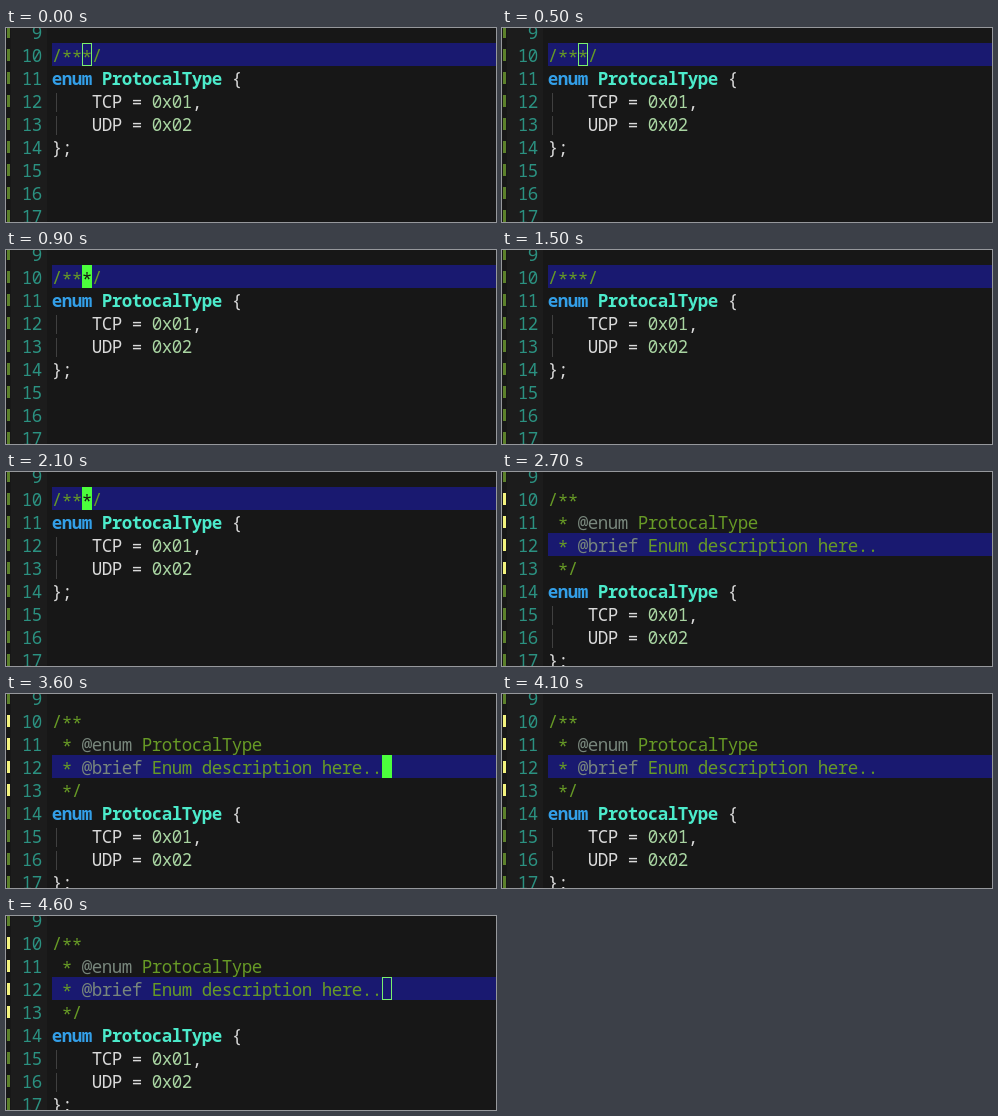
Write an HTML page with a canvas that moves like this. It is 490 px wide and 194 px high and loops after 4.7 s.

```html
<!DOCTYPE html>
<html lang="en">
<head>
<meta charset="utf-8">
<title>Enum doc comment</title>
<style>
  html, body { margin: 0; width: 490px; height: 194px; overflow: hidden; background: #171717; }
  canvas { display: block; }
</style>
</head>
<body>
<canvas id="stage" width="490" height="194"></canvas>
<script>
const ctx = document.getElementById('stage').getContext('2d');
const W = 490, H = 194, LOOP = 4700;
const CELL = 10, ROW = 23, LEFT = 46, FIRST = 9, TOP = -8;
const FOCUS = 800, EXPAND = 2200, BLUR = 4400, BLINK = 500;

const C = {
  bg: '#171717', gutter: '#1c1c1c', line: '#191970', number: '#2b9181',
  added: '#5c812b', changed: '#f3f37e', cursor: '#4cff3c', hollow: '#7af06e',
  text: '#dadada', keyword: '#339fe8', type: '#4cebcb', value: '#a9d5a2',
  comment: '#679a26', tag: '#78867c', guide: '#404040'
};

// Each line is a list of [text, colour] runs.
const code = [
  [['enum ', C.keyword], ['ProtocalType', C.type], [' {', C.text]],
  [['    TCP = ', C.text], ['0x01', C.value], [',', C.text]],
  [['    UDP = ', C.text], ['0x02', C.value]],
  [['};', C.text]]
];
const before = [[], [['/***/', C.comment]], ...code];
const after = [
  [],
  [['/**', C.comment]],
  [[' * ', C.comment], ['@enum', C.tag], [' ProtocalType', C.comment]],
  [[' * ', C.comment], ['@brief', C.tag], [' Enum description here..', C.comment]],
  [[' */', C.comment]],
  ...code
];

const rowTop = n => TOP + (n - FIRST) * ROW;

function rect(x, y, w, h, color) {
  ctx.fillStyle = color;
  ctx.fillRect(x, y, w, h);
}

function write(text, x, top, color) {
  const strong = color === C.keyword || color === C.type;
  ctx.font = `${strong ? 600 : 400} 17.5px "Noto Sans Mono", "DejaVu Sans Mono", monospace`;
  ctx.fillStyle = color;
  [...text].forEach((ch, i) => {
    const drop = ch === '*' ? 2 : 0;
    ctx.fillText(ch, x + (i + 0.5) * CELL, top + 19 + drop);
  });
}

function cursorMode(t) {
  if (t < FOCUS || t >= BLUR) return 'hollow';
  const since = t - (t < EXPAND ? FOCUS : EXPAND);
  return Math.floor(since / BLINK) % 2 ? 'off' : 'solid';
}

function drawCursor(mode, col, row, under) {
  const x = LEFT + col * CELL, y = rowTop(row);
  if (mode === 'solid') {
    rect(x, y, CELL, ROW, C.cursor);
    write(under, x, y, C.bg);
  } else if (mode === 'hollow') {
    ctx.strokeStyle = C.hollow;
    ctx.strokeRect(x + 0.5, y + 0.5, CELL - 1, ROW - 1);
  }
}

function draw(t) {
  const open = t >= EXPAND;
  const lines = open ? after : before;
  const active = open ? 12 : 10;

  rect(0, 0, W, H, C.bg);
  rect(5, 0, LEFT - 10, H, C.gutter);
  rect(LEFT, rowTop(active), W - LEFT, ROW, C.line);

  for (let n = FIRST; n <= 17; n++) {
    const y = rowTop(n), fresh = open && n >= 10 && n <= 13;
    rect(1, y + 6, 3, 12, fresh ? C.changed : C.added);
    write(String(n).padStart(2), 16, y, C.number);

    let x = LEFT;
    for (const [text, color] of lines[n - FIRST] || []) {
      if (text.startsWith('    ')) rect(LEFT + 4, y + 4, 1, 19, C.guide);
      write(text, x, y, color);
      x += text.length * CELL;
    }
  }
  drawCursor(cursorMode(t), open ? 33 : 3, active, open ? '' : '*');
}

ctx.textAlign = 'center';
ctx.lineWidth = 1;

const start = performance.now();
function tick() {
  draw((performance.now() - start) % LOOP);
  requestAnimationFrame(tick);
}
tick();
</script>
</body>
</html>
```
